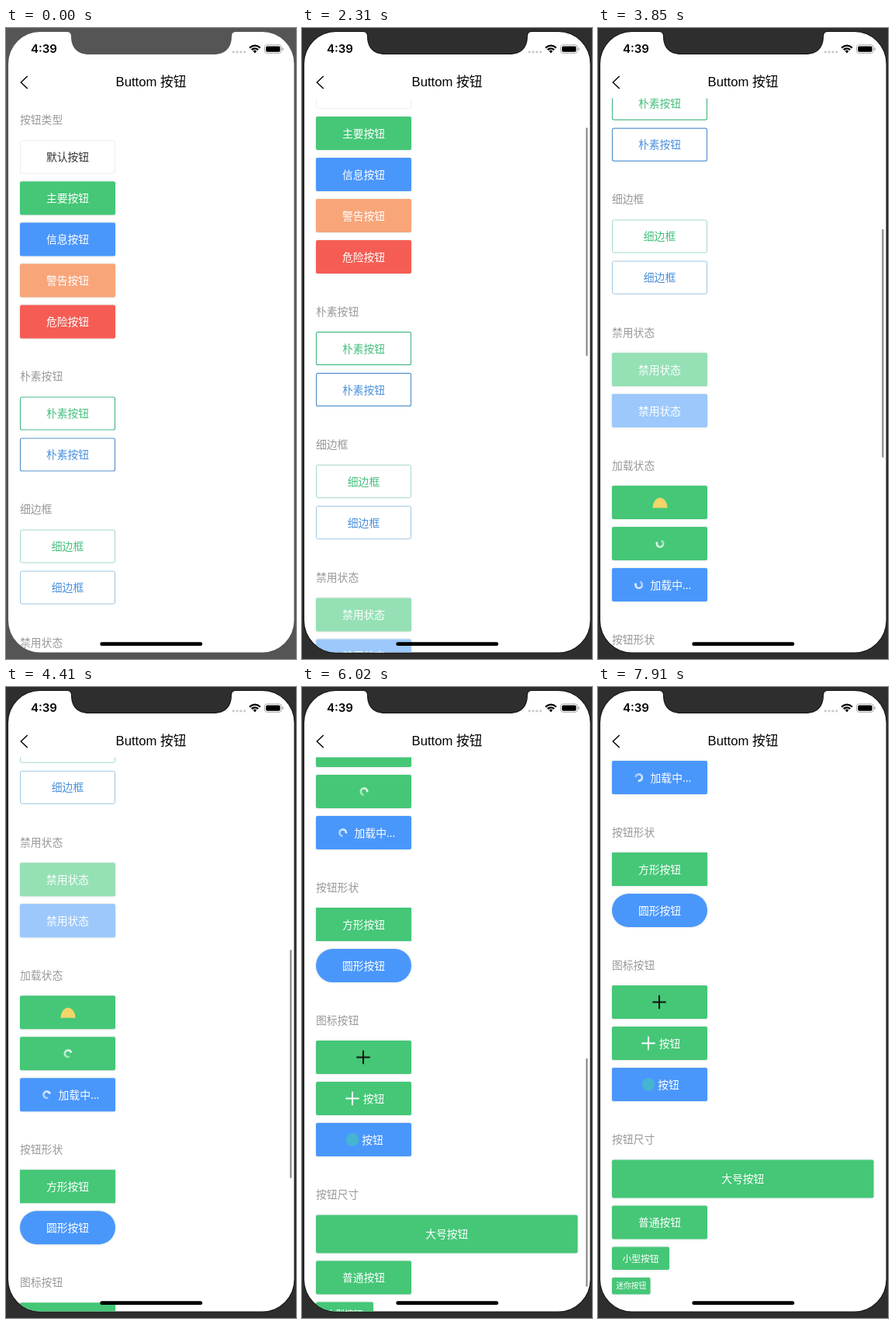
An HTML page with a canvas for the animation above (7980 ms loop, 374 px wide and 812 px high).

```html
<!DOCTYPE html>
<html lang="zh">
<head>
<meta charset="utf-8">
<style>
  html, body { margin: 0; width: 100%; height: 100%; overflow: hidden; background: #fff; }
  canvas { display: block; width: 374px; height: 812px; }
</style>
</head>
<body>
<canvas></canvas>
<script>
const W = 374, H = 812, LOOP = 7980, SCROLL_START = 1470;
const GREEN = '#45c777', BLUE = '#4a97fc';
const CJK = '"Noto Sans CJK SC", "Noto Sans CJK", sans-serif';
const canvas = document.querySelector('canvas');
const ctx = canvas.getContext('2d');
const dpr = window.devicePixelRatio || 1;
canvas.width = W * dpr;
canvas.height = H * dpr;

// [time in ms, scroll offset in px]
const scrollKeys = [
  [1400, 0], [2310, 83.5], [3290, 223.5], [4410, 590.5],
  [5250, 771], [6650, 996.5], [7250, 999]
];
const slopes = scrollKeys.slice(1).map(([t, y], i) =>
  (y - scrollKeys[i][1]) / (t - scrollKeys[i][0]));
const tangents = scrollKeys.map((_, i) => {
  const a = slopes[i - 1], b = slopes[i];
  return a && b ? 2 * a * b / (a + b) : 0;
});

// Monotone cubic interpolation through the scroll keys
function scrollAt(t) {
  const last = scrollKeys.length - 1;
  if (t <= scrollKeys[0][0]) return 0;
  if (t >= scrollKeys[last][0]) return scrollKeys[last][1];
  const i = scrollKeys.findIndex(k => k[0] > t) - 1;
  const [t0, y0] = scrollKeys[i], [t1, y1] = scrollKeys[i + 1];
  const d = t1 - t0, u = (t - t0) / d, v = 1 - u;
  return y0 * (1 + 2 * u) * v * v + tangents[i] * d * u * v * v
       + y1 * u * u * (3 - 2 * u) - tangents[i + 1] * d * u * u * v;
}

function text(str, x, cy, size, color, align = 'center') {
  ctx.font = `${size}px ${CJK}`;
  ctx.textAlign = align;
  ctx.fillStyle = color;
  ctx.fillText(str, x, cy + size * 0.38);
}

function box(x, y, w, h, r) {
  ctx.beginPath();
  ctx.roundRect(x, y, w, h, r);
}

function fillBox(x, y, w, h, r, color) {
  box(x, y, w, h, r);
  ctx.fillStyle = color;
  ctx.fill();
}

function line(points, color, width) {
  ctx.beginPath();
  points.forEach(([x, y]) => ctx.lineTo(x, y));
  ctx.strokeStyle = color;
  ctx.lineWidth = width;
  ctx.stroke();
}

function disc(x, y, r, color) {
  ctx.beginPath();
  ctx.arc(x, y, r, 0, 7);
  ctx.fillStyle = color;
  ctx.fill();
}

function heading(label, cy) {
  text(label, 18, cy, 13.8, '#999', 'left');
}

function button(y, color, label = '', { w = 123, h = 43, r = 2, size = 13.8, dx = 0 } = {}) {
  ctx.save();
  ctx.shadowColor = 'rgba(40,90,70,.22)';
  ctx.shadowBlur = 3 * dpr;
  fillBox(18, y, w, h, r, color);
  ctx.restore();
  text(label, 18 + w / 2 + dx, y + h / 2, size, '#fff');
}

function outline(y, border, color, label, width = 1) {
  fillBox(18, y, 123, 43, 2, '#fff');
  box(18.5, y + 0.5, 122, 42, 2);
  ctx.strokeStyle = border;
  ctx.lineWidth = width;
  ctx.stroke();
  text(label, 79.5, y + 21.5, 13.8, color);
}

function plus(x, y, color) {
  line([[x - 8.7, y], [x + 8.7, y]], color, 2);
  line([[x, y - 8.7], [x, y + 8.7]], color, 2);
}

function spinner(x, y, t) {
  const gap = (t * 0.24 + 45) * Math.PI / 180;
  ctx.lineWidth = 2.6;
  for (let i = 0; i < 12; i++) {
    const a = gap + 0.75 + i * 0.4;
    ctx.beginPath();
    ctx.arc(x, y, 4.2, a, a + 0.42);
    ctx.strokeStyle = `rgba(255,255,255,${0.5 + i * 0.04})`;
    ctx.stroke();
  }
}

function content(t) {
  heading('按钮类型', 118);
  outline(144.5, '#eee', '#333', '默认按钮');
  button(197.5, GREEN, '主要按钮');
  button(250.5, BLUE, '信息按钮');
  button(303.5, '#f8a579', '警告按钮');
  button(356.5, '#f55d54', '危险按钮');

  heading('朴素按钮', 448);
  outline(474.5, '#4bbb86', '#45c07d', '朴素按钮', 1.2);
  outline(527.5, '#5794d0', '#4a90dc', '朴素按钮', 1.2);

  heading('细边框', 619);
  outline(645.5, '#a3d9bf', '#45c07d', '细边框');
  outline(698.5, '#a0c5e0', '#4a90dc', '细边框');

  heading('禁用状态', 790.5);
  button(817, '#95e0b5', '禁用状态');
  button(870, '#9cc8fb', '禁用状态');

  heading('加载状态', 961.5);
  button(988, GREEN);
  ctx.beginPath();
  ctx.ellipse(80, 1016.5, 9.5, 13, 0, Math.PI, 2 * Math.PI);
  ctx.fillStyle = '#f3d568';
  ctx.fill();
  button(1041, GREEN);
  spinner(80, 1062.5, t);
  button(1094, BLUE, '加载中...', { dx: 14.5 });
  spinner(52.7, 1115.5, t);

  heading('按钮形状', 1185.5);
  button(1212, GREEN, '方形按钮', { r: 0 });
  button(1265, BLUE, '圆形按钮', { r: 21.5 });

  heading('图标按钮', 1356.5);
  button(1383, GREEN);
  plus(79, 1404.5, '#111');
  button(1436, GREEN, '按钮', { dx: 13 });
  plus(65, 1457.5, '#fff');
  button(1489, BLUE, '按钮', { dx: 11.5 });
  disc(65, 1510.5, 8.3, '#46b5d2');

  heading('按钮尺寸', 1581);
  button(1607.5, GREEN, '大号按钮', { w: 337.5, h: 49 });
  button(1666.5, GREEN, '普通按钮');
  button(1719.5, GREEN, '小型按钮', { w: 74, h: 29.5, size: 11.8 });
  button(1759, GREEN, '迷你按钮', { w: 49.5, h: 21.5, size: 9.8 });
}

function scrollBar(t, scroll) {
  if (t < SCROLL_START) return;
  const top = 93.5 + scroll * 0.4142;
  const alpha = 0.4 * Math.min(1, Math.max(0, (7650 - t) / 250));
  fillBox(366, top, 2.6, Math.min(294, 783.5 - top), 1.3, `rgba(0,0,0,${alpha})`);
}

function statusBar() {
  ctx.fillStyle = '#000';
  ctx.textAlign = 'left';
  ctx.font = '600 15px Inter, sans-serif';
  ctx.fillText('4:39', 32, 32.3);
  for (let i = 0; i < 4; i++) disc(293.3 + i * 4.8, 30.8, 1.6, '#c8c8c8');

  ctx.strokeStyle = '#000';
  ctx.lineWidth = 2.3;
  for (const r of [5.7, 9.3]) {
    ctx.beginPath();
    ctx.arc(321, 32, r, -Math.PI * 0.76, -Math.PI * 0.24);
    ctx.stroke();
  }
  ctx.beginPath();
  ctx.moveTo(321, 32.5);
  ctx.arc(321, 32, 3.2, -Math.PI * 0.76, -Math.PI * 0.24);
  ctx.fillStyle = '#000';
  ctx.fill();

  box(333.5, 21.8, 21.8, 10.6, 3);
  ctx.strokeStyle = '#aaa';
  ctx.lineWidth = 1;
  ctx.stroke();
  fillBox(335.2, 23.5, 18.4, 7.2, 1.6, '#000');
  fillBox(356.3, 25.2, 1.4, 3.8, 0.7, '#aaa');
}

function header() {
  line([[27.7, 62], [19.2, 70], [27.7, 78]], '#000', 1.4);
  ctx.font = `16.7px "Liberation Sans", ${CJK}`;
  ctx.textAlign = 'center';
  ctx.fillStyle = '#000';
  ctx.fillText('Buttom 按钮', 187, 75.3);
}

function screenPath() {
  const l = 3, r = 371.5, top = 5, bottom = 803.5, c = 41;
  ctx.beginPath();
  ctx.moveTo(l + c, top);
  ctx.lineTo(79, top);
  ctx.quadraticCurveTo(84, top, 84, 11);
  ctx.bezierCurveTo(84, 25, 92, 34, 107, 34);
  ctx.lineTo(268, 34);
  ctx.bezierCurveTo(283, 34, 291, 25, 291, 11);
  ctx.quadraticCurveTo(291, top, 296, top);
  ctx.arcTo(r, top, r, bottom, c);
  ctx.arcTo(r, bottom, l, bottom, c);
  ctx.arcTo(l, bottom, l, top, c);
  ctx.arcTo(l, top, r, top, c);
  ctx.closePath();
}

function draw(t) {
  const active = t >= SCROLL_START, scroll = scrollAt(t);
  ctx.setTransform(dpr, 0, 0, dpr, 0, 0);
  ctx.fillStyle = active ? '#2e2e2e' : '#555';
  ctx.fillRect(0, 0, W, H);
  screenPath();
  if (active) {
    ctx.strokeStyle = '#151515';
    ctx.lineWidth = 2;
    ctx.stroke();
  }
  ctx.fillStyle = '#fff';
  ctx.fill();

  ctx.save();
  ctx.clip();
  ctx.save();
  ctx.beginPath();
  ctx.rect(0, 90.5, W, H);
  ctx.clip();
  ctx.translate(0, -scroll);
  content(t);
  ctx.restore();
  scrollBar(t, scroll);
  ctx.restore();

  statusBar();
  header();
  fillBox(121.3, 790.3, 132, 4.8, 2.4, '#000');
}

const start = performance.now();
function tick() {
  draw((performance.now() - start) % LOOP);
  requestAnimationFrame(tick);
}
tick();
</script>
</body>
</html>
```
